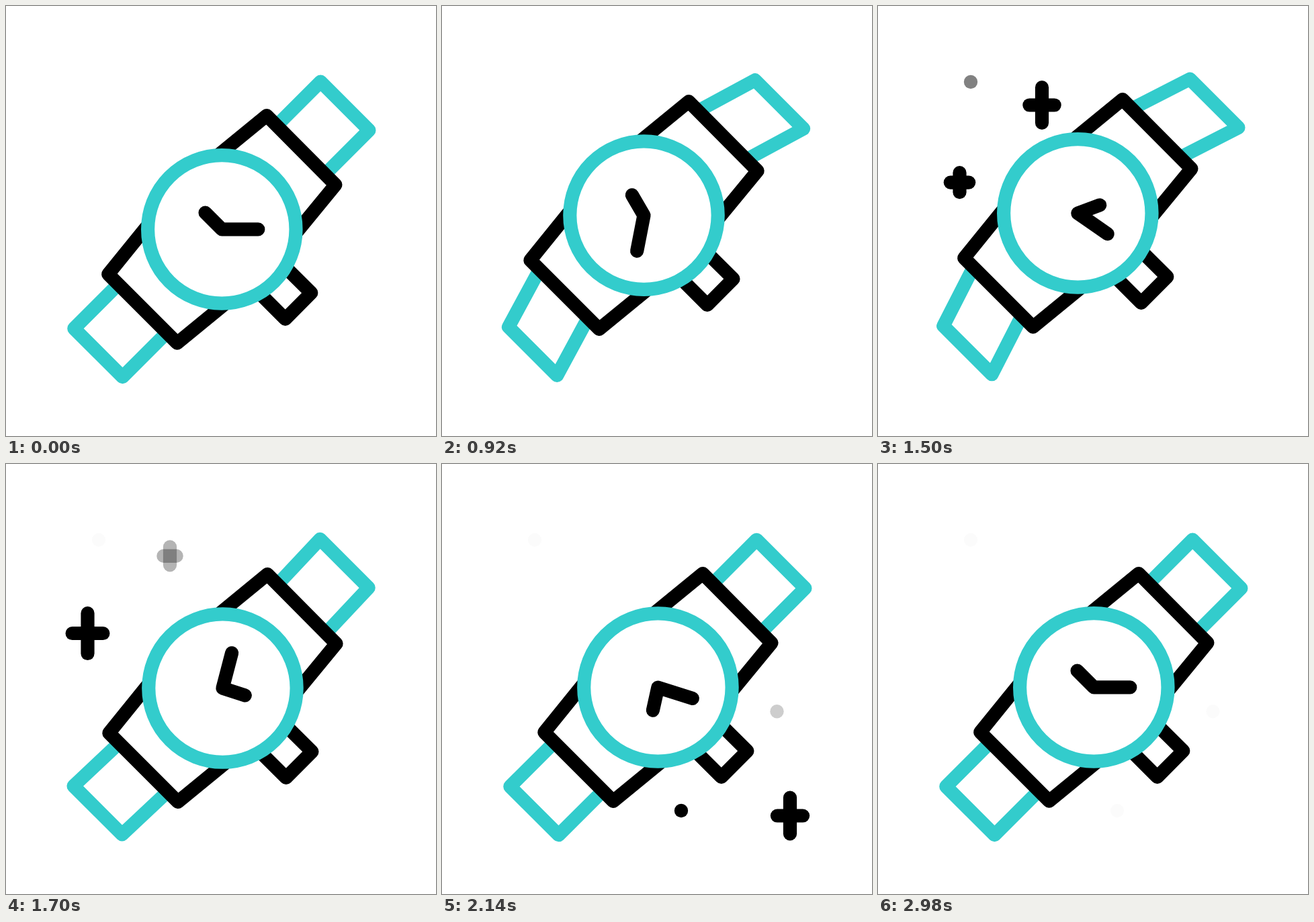
An HTML page with a canvas that plays this animation: 640 by 640 pixels, repeating every 3.6 s.

```html
<!DOCTYPE html>
<html lang="en">
<head>
<meta charset="utf-8">
<title>Wristwatch</title>
<style>
  html, body { margin: 0; width: 100%; height: 100%; overflow: hidden; background: #fff; }
  canvas { display: block; width: 100vmin; height: 100vmin; }
</style>
</head>
<body>
<canvas id="stage" width="640" height="640"></canvas>
<script>
const LOOP = 3600, TEAL = '#33cccc', BLACK = '#000';
const CX = 321.3, CY = 332.4;
const ctx = document.getElementById('stage').getContext('2d');

const clamp = v => Math.max(0, Math.min(1, v));
const ease = (t, from, to) => (1 - Math.cos(Math.PI * clamp((t - from) / (to - from)))) / 2;

// Progress 0..1 that speeds up evenly, cruises, then slows down evenly.
function cruise(t, start, end, rampIn, rampOut) {
  const speed = 1 / (end - start - (rampIn + rampOut) / 2);
  const since = Math.max(0, t - start), left = Math.max(0, end - t);
  if (since < rampIn) return speed * since ** 2 / (2 * rampIn);
  if (left < rampOut) return 1 - speed * left ** 2 / (2 * rampOut);
  return speed * (since - rampIn / 2);
}

// Diagonal swings of the watch body and, more gently, of the strap ends.
const bodyShift = t => 2 * ease(t, 0, 390) - 33 * ease(t, 390, 1240)
  + 42.2 * ease(t, 1370, 1860) - 11.2 * ease(t, 1860, 2160);
const endShift = t => 3.4 * ease(t, 0, 580) - 7.4 * ease(t, 580, 1080)
  + 6 * ease(t, 1480, 1900) - 2 * ease(t, 1900, 2160);

// Both hands wind back a little, then turn one lap and five laps.
const hourTurn = t => -12 * ease(t, 0, 460) + 372 * cruise(t, 460, 2980, 760, 400);
const minuteTurn = t => -15 * ease(t, 0, 590) + 1815 * cruise(t, 590, 2980, 590, 1285);

// x, y and start time
const sparkles = [[244, 164.5, 1180], [121.5, 264, 1475], [518, 540, 1830]];
const dots = [[138, 113, 1200], [498.5, 368.3, 1780], [356, 516, 1960]];

function line(points, color, fill) {
  ctx.beginPath();
  points.forEach(([x, y]) => ctx.lineTo(x, y));
  if (fill) {
    ctx.fillStyle = fill;
    ctx.fill();
  }
  ctx.strokeStyle = color;
  ctx.stroke();
}

function polar(length, degrees) {
  const a = degrees * Math.PI / 180;
  return [CX + length * Math.cos(a), CY + length * Math.sin(a)];
}

// A rising plus sign that pops open, then shrinks and fades.
function drawSparkle(x, y, age) {
  if (age < -65 || age > 580) return;
  const arm = (delay, grow, peak, shrink) =>
    Math.max(.01, Math.min(grow * (age + delay), peak, shrink * (735 - age)));
  const w = arm(70, .143, 28, .045), h = arm(47, .2, 30, .0635);
  const cy = y - age * .053;
  ctx.globalAlpha = clamp((580 - age) / 200);
  line([[x - w, cy], [x + w, cy]], BLACK);
  line([[x, cy - h], [x, cy + h]], BLACK);
}

// A dot that blinks and leaves a faint trace until the loop restarts.
function drawDot(x, y, age) {
  const trace = age > 200 ? .015 : 0;
  ctx.globalAlpha = Math.max(trace, clamp(Math.min(age / 80, (400 - age) / 200)));
  ctx.fillStyle = BLACK;
  ctx.beginPath();
  ctx.arc(x, y, 10.2, 0, 7);
  ctx.fill();
}

// The tips and the roots of a strap move separately, so it leans.
function drawStrap(x, y, reach, tip, root) {
  const side = 72.2, rx = x + reach + root, ry = y - reach + root;
  line([[rx, ry], [x + tip, y + tip], [x + side + tip, y + side + tip], [rx + side, ry + side]], TEAL);
}

function drawBody(t) {
  line([[318, 220.3], [388, 163], [490.4, 266.2], [433, 336]], BLACK, '#fff');
  line([[209, 329], [152.2, 399.2], [254.7, 501.7], [324, 445]], BLACK, '#fff');
  line([[414, 387], [454.3, 427], [415.7, 465.8], [375.5, 425.7]], BLACK, '#fff');
  ctx.beginPath();
  ctx.arc(CX, CY, 110.2, 0, 7);
  ctx.fillStyle = '#fff';
  ctx.fill();
  ctx.strokeStyle = TEAL;
  ctx.stroke();
  line([polar(35, 225 + hourTurn(t)), [CX, CY], polar(54, minuteTurn(t))], BLACK);
}

function draw(t) {
  const root = bodyShift(t), tip = endShift(t);
  ctx.fillStyle = '#fff';
  ctx.fillRect(0, 0, 640, 640);
  ctx.lineWidth = 20.2;
  ctx.lineCap = ctx.lineJoin = 'round';
  sparkles.forEach(([x, y, start]) => drawSparkle(x, y, t - start));
  dots.forEach(([x, y, start]) => drawDot(x, y, t - start));
  ctx.globalAlpha = 1;
  drawStrap(468.2, 112.7, -62, tip, root);
  drawStrap(101.3, 480, 62, tip, root);
  ctx.save();
  ctx.translate(root, root);
  drawBody(t);
  ctx.restore();
}

const begin = performance.now();
function tick() {
  draw((performance.now() - begin) % LOOP);
  requestAnimationFrame(tick);
}
tick();
</script>
</body>
</html>
```
